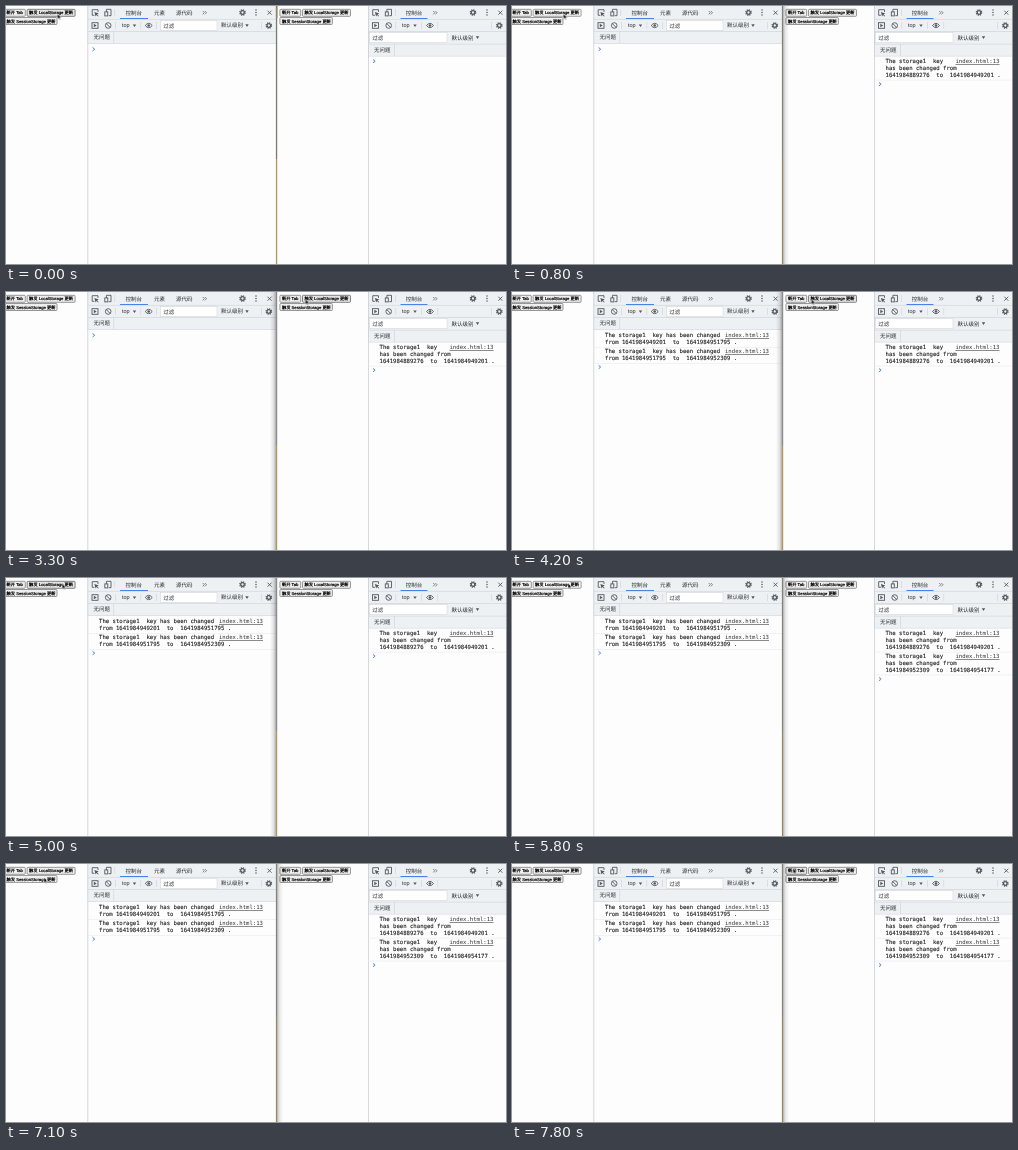
An HTML page that plays this animation: 500x258 px, repeating every 8000 ms.

```html
<!DOCTYPE html>
<html lang="zh-CN">
<head>
<meta charset="utf-8">
<title>Storage events</title>
<style>
html, body { margin: 0; width: 100%; height: 100%; overflow: hidden; background: #fdfdfd; }
svg { display: block; width: 500px; height: 258px; }
text { white-space: pre; text-rendering: geometricPrecision; fill: #2b2d30;
  font: 5.5px "Liberation Sans", "Noto Sans CJK SC", "Noto Sans CJK", sans-serif; }
.label { font-size: 4.22px; font-weight: 500; fill: #000; stroke: #000; stroke-width: .2; }
.log { font: 5.64px "DejaVu Sans Mono", monospace; fill: #1c1c1c; stroke: #1c1c1c; stroke-width: .1; }
.link { text-anchor: end; text-decoration: underline; fill: #333; stroke: none; }
.icon { fill: none; stroke: #54585d; stroke-width: .9; }
.solid { fill: #54585d; stroke: none; }
.btn { fill: #efefef; stroke: #6e6e6e; stroke-width: .7; }
.prompt { fill: none; stroke: #3f73cc; stroke-width: .9; }

.anim { animation: 8s step-end -10ms infinite; }
.msg1 { animation-name: msg1; }
.msg2 { animation-name: msg2; }
.msg3 { animation-name: msg3; }
.msg4 { animation-name: msg4; }
@keyframes msg1 { 0% { opacity: 0 } 10%, 100% { opacity: 1 } }
@keyframes msg2 { 0% { opacity: 0 } 42.5%, 100% { opacity: 1 } }
@keyframes msg3 { 0% { opacity: 0 } 48.75%, 100% { opacity: 1 } }
@keyframes msg4 { 0% { opacity: 0 } 72.5%, 100% { opacity: 1 } }

.promptL { animation-name: promptL; }
.promptR { animation-name: promptR; }
@keyframes promptL {
  0% { transform: none } 42.5% { transform: translateY(15.9px) }
  48.75%, 100% { transform: translateY(31.8px) }
}
@keyframes promptR {
  0% { transform: none } 10% { transform: translateY(22.9px) }
  72.5%, 100% { transform: translateY(45.8px) }
}

/* Button states: plain, hover, pressed */
.localL { animation-name: localL; }
.localR { animation-name: localR; }
.sessionL { animation-name: sessionL; }
.tabR { animation-name: tabR; }
@keyframes localL {
  0%, 58.75%, 77.5% { fill: #e5e5e5; stroke: #4f4f4f }
  10%, 72.5% { fill: #f2f2f2; stroke: #7d7d7d }
  21.25%, 78.75%, 100% { fill: #efefef; stroke: #6e6e6e }
}
@keyframes localR {
  0%, 53.75%, 100% { fill: #efefef; stroke: #6e6e6e }
  30%, 43.75%, 51.25% { fill: #e5e5e5; stroke: #4f4f4f }
  42.5%, 48.75% { fill: #f2f2f2; stroke: #7d7d7d }
}
@keyframes sessionL {
  0%, 95%, 100% { fill: #efefef; stroke: #6e6e6e }
  81.25%, 92.5% { fill: #e5e5e5; stroke: #4f4f4f }
  88.75% { fill: #f2f2f2; stroke: #7d7d7d }
}
@keyframes tabR {
  0% { fill: #efefef; stroke: #6e6e6e }
  97.5%, 100% { fill: #e5e5e5; stroke: #4f4f4f }
}

/* Window edge: idle, left window in front, right window in front */
.edgeIdle { animation-name: edgeIdle; }
.edgeL { animation-name: edgeL; }
.edgeR { animation-name: edgeR; }
@keyframes edgeIdle { 0% { opacity: 1 } 1.25%, 100% { opacity: 0 } }
@keyframes edgeL { 0%, 32.5% { opacity: 0 } 1.25%, 63.75%, 100% { opacity: 1 } }
@keyframes edgeR { 0%, 63.75%, 100% { opacity: 0 } 32.5% { opacity: 1 } }

.cursor { animation-name: cursor; }
@keyframes cursor {
  0% { transform: translate(51.5px, 7.8px) }
  20% { transform: translate(51.5px, 7.8px); animation-timing-function: steps(2) }
  22.5% { transform: translate(249px, 30px) }
  23.75% { transform: translate(249px, 30px); animation-timing-function: steps(5) }
  30% { transform: translate(303.5px, 7px) }
  36.25% { transform: translate(303.5px, 7px); animation-timing-function: steps(4) }
  41.25% { transform: translate(299.5px, 7.2px) }
  52.5% { transform: translate(299.5px, 7.2px); animation-timing-function: steps(5) }
  58.75% { transform: translate(57px, 7px); animation-timing-function: steps(4) }
  63.75% { transform: translate(56px, 5.2px) }
  76.25% { transform: translate(56px, 5.2px); animation-timing-function: steps(7) }
  85% { transform: translate(38px, 13.5px) }
  93.75% { transform: translate(38px, 13.5px); animation-timing-function: steps(3) }
  97.5%, 100% { transform: translate(281.2px, 4.4px) }
}
</style>
</head>
<body>
<svg id="stage" viewBox="0 0 500 258">
  <defs>
    <linearGradient id="shadeR">
      <stop offset="0" stop-color="#000" stop-opacity=".24"/>
      <stop offset=".4" stop-color="#000" stop-opacity=".09"/>
      <stop offset="1" stop-color="#000" stop-opacity="0"/>
    </linearGradient>
    <linearGradient id="shadeL" x1="1" x2="0">
      <stop offset="0" stop-color="#000" stop-opacity=".3"/>
      <stop offset=".4" stop-color="#000" stop-opacity=".11"/>
      <stop offset="1" stop-color="#000" stop-opacity="0"/>
    </linearGradient>
  </defs>
</svg>
<script>
const BAR = '#eef1f4', LINE = '#cdd1d6';

const rect = (x, y, w, h, fill, extra = '') =>
  `<rect x="${x}" y="${y}" width="${w}" height="${h}" fill="${fill}" ${extra}/>`;
const text = (x, y, s, cls = '') => `<text x="${x}" y="${y}" class="${cls}">${s}</text>`;
const icon = (x, y, body) => `<g class="icon" transform="translate(${x} ${y})">${body}</g>`;
const rule = (y, x, w, color = LINE) => rect(x, y, w, .6, color);
const bar = (x, y, h = 7) => rect(x, y - h / 2, .6, h, LINE);
const group = (cls, body) => `<g class="anim ${cls}">${body}</g>`;

const inspect = (x, y) => icon(x, y,
  '<path d="M3 -.6V-2.8H-2.8V2.8H-.6"/><path class="solid" d="M-.6 -.6L3.8 1L2 1.9L3.7 3.5L3.1 4L1.5 2.4L.6 4Z"/>');
const device = (x, y) => icon(x, y,
  '<path d="M-1.6 -.4V-3.2H3V3.2H.8"/><rect x="-3.2" y="-.6" width="3" height="4"/>');
const panel = (x, y) => icon(x, y,
  '<rect x="-3" y="-2.8" width="6" height="5.6"/><path class="solid" d="M-1.2 -1.7L1.7 0L-1.2 1.7Z"/>');
const block = (x, y) => icon(x, y, '<circle r="2.8"/><path d="M-2 -2L2 2"/>');
const eye = (x, y) => icon(x, y,
  '<path d="M-3.5 0Q0 -4.4 3.5 0Q0 4.4 -3.5 0Z"/><circle class="solid" r="1.3"/>');
const gear = (x, y) => icon(x, y,
  '<circle r="2.7" stroke-width="1.2" stroke-dasharray="1.2 .92"/><circle r="1.8" stroke-width="1.3"/>');
const dots = (x, y) => icon(x, y, [-2.4, 0, 2.4].map(d => `<circle class="solid" cy="${d}" r=".75"/>`).join(''));
const cross = (x, y) => icon(x, y, '<path d="M-2 -2L2 2M2 -2L-2 2"/>');
const more = (x, y) => icon(x, y, '<path d="M-1.8 -1.7L-.2 0L-1.8 1.7M.4 -1.7L2 0L.4 1.7" stroke-width=".7"/>');
const caret = (x, y) => icon(x, y, '<path class="solid" d="M-1.7 -1.2H1.7L0 1.5Z"/>');

const button = (x, y, w, s, tx, name) =>
  `<rect class="btn anim ${name}" x="${x}" y="${y}" width="${w}" height="7" rx=".9"/>` +
  text(tx, y + 5.1, s, 'label');

const page = (x, side) => `<g transform="translate(${x} 0)">` +
  button(-1.5, 3.3, 20.8, '新开 Tab', .6, 'tab' + side) +
  button(21.1, 3.3, 48, '触发 LocalStorage 更新', 23.1, 'local' + side) +
  button(-1.5, 11.5, 52.5, '触发 SessionStorage 更新', .6, 'session' + side) + '</g>';

const field = (x, y, w) =>
  rect(x, y, w, 10, '#fff', `stroke="${LINE}" stroke-width=".5"`) + text(x + 2.8, y + 7, '过滤');
const levels = (x, y) => text(x, y + 2, '默认级别') + caret(x + 26, y);

// Toolbar parts that both windows share
const tools = (x, w, rows) =>
  rect(x, 0, w, rows, BAR) + rect(x, 0, .7, 258, '#c4c8cc') +
  rule(12.9, x, w) + rule(rows, x, w) +
  inspect(x + 7.5, 6.5) + device(x + 20.5, 6.5) + bar(x + 27, 6.5) +
  panel(x + 7.5, 19.5) + block(x + 20.7, 19.5) + bar(x + 27.5, 19.5);

const issues = (x, y, w) =>
  rule(y - 6.2, x, w) + bar(x + 26, y, 12) + text(x + 6, y + 2, '无问题');

const entry = (x, right, y, lines, w, left) =>
  lines.map((s, i) => text(x, y + i * 6.7, s, 'log')).join('') +
  text(right, y, 'index.html:13', 'log link') +
  rule(y + lines.length * 6.8 - 3.8, left, w, '#e9ebee');

const logL = (y, a, b) => entry(93, 257, y,
  ['The storage1  key has been changed', `from ${a}  to  ${b} .`], 188, 82);
const logR = (y, a, b) => entry(373.5, 487.5, y,
  ['The storage1  key', 'has been changed from', `${a}  to  ${b} .`], 138, 362);

const prompt = (x, y, side) =>
  group('prompt' + side, `<path class="prompt" d="M${x} ${y - 1.7}l2.1 1.7l-2.1 1.7"/>`);

const left = page(0, 'L') + tools(81.5, 188.5, 37.2) +
  text(119.5, 8.5, '控制台') + rect(114, 12, 28, 1, '#4a83e8') +
  text(148, 8.5, '元素') + text(170, 8.5, '源代码') + more(198.5, 6.7) +
  gear(236.5, 6.5) + dots(250, 6.5) + cross(263.5, 6.7) +
  text(116, 21.3, 'top') + caret(128.5, 19.6) + bar(134.5, 19.5) + eye(142.7, 19.5) +
  bar(150.3, 19.5) + field(154.5, 14.5, 56.5) + levels(215, 19.4) + bar(255, 19.5) + gear(262.8, 19.5) +
  issues(81.5, 31.3, 188.5) +
  group('msg2', logL(45.3, '1641984949201', '1641984951795')) +
  group('msg3', logL(61.2, '1641984951795', '1641984952309')) +
  prompt(86.6, 43.2, 'L');

const right = page(275.4, 'R') + tools(362, 138, 49.8) +
  text(399.8, 8.5, '控制台') + rect(394.5, 12, 27, 1, '#4a83e8') + more(429, 6.7) +
  gear(467, 6.5) + dots(481, 6.5) + cross(494.3, 6.7) +
  text(396, 21.3, 'top') + caret(409, 19.6) + bar(415.3, 19.5) + eye(424, 19.5) +
  bar(431.5, 19.5) + bar(485, 19.5) + gear(493.3, 19.5) +
  rule(25.2, 362, 138) + field(363.5, 26.6, 77.5) + levels(445.5, 31.5) +
  issues(362, 44, 138) +
  group('msg1', logR(57.2, '1641984889276', '1641984949201')) +
  group('msg4', logR(80.1, '1641984952309', '1641984954177')) +
  prompt(367, 55.2, 'R');

// Border between the windows, with the desktop showing below
const seam = (upper, lower) =>
  rect(269.9, 0, 1.3, 153, upper) + rect(269.9, 153, 1.3, 105, lower);

const edges =
  group('edgeIdle', seam('#7b7972', '#b3935c') + rect(269.9, 0, 1.6, 12, '#9b8257')) +
  group('edgeL', seam('#82807a', '#968663') + rect(271.2, 0, 5.8, 258, 'url(#shadeR)')) +
  group('edgeR', rect(264, 0, 6, 258, 'url(#shadeL)') + seam('#8b8b8b', '#b3975f'));

const cursor = group('cursor',
  '<path d="M0 0V5.2L1.2 4.1L2 6L2.9 5.6L2.1 3.8H3.8Z" fill="#000" stroke="#fff" stroke-width=".5"/>');

document.getElementById('stage').insertAdjacentHTML('beforeend', left + right + edges + cursor);
</script>
</body>
</html>
```
